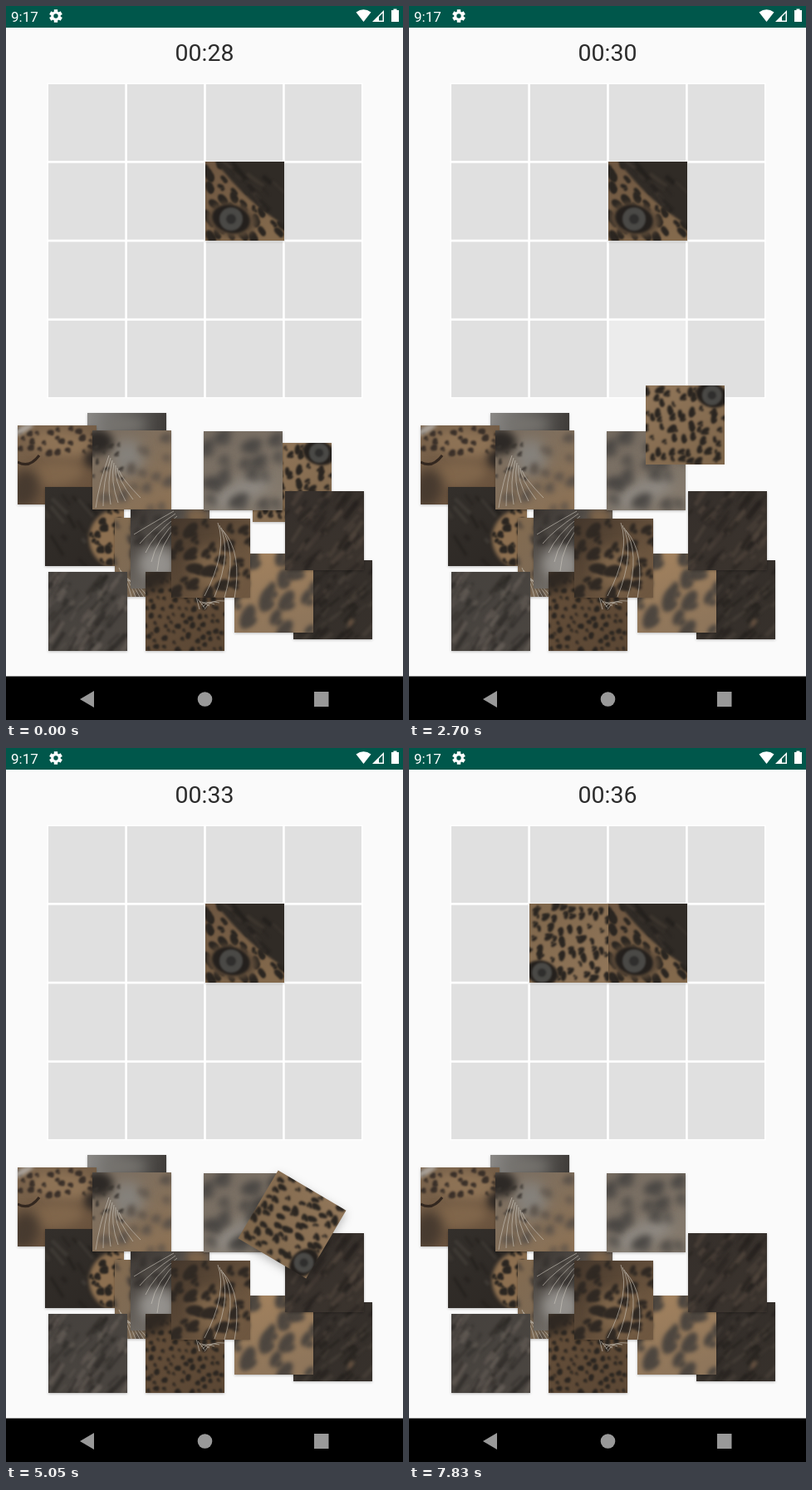
These frames come from a looping animation (478 by 858 pixels, 8.29 s). An HTML page with a canvas:

```html
<!DOCTYPE html>
<html lang="en">
<head>
<meta charset="utf-8">
<title>Picture puzzle</title>
<style>
html, body { margin: 0; width: 100%; height: 100%; overflow: hidden; background: #fafafa; }
canvas { display: block; width: 478px; height: 858px; }
</style>
</head>
<body>
<canvas id="stage" width="478" height="858"></canvas>
<script>
const ctx = document.getElementById('stage').getContext('2d');
const LOOP = 8290, SIZE = 95, DARK = '#2b2621';

function seeded(seed) {
  return () => {
    seed = (seed * 1664525 + 1013904223) % 4294967296;
    return seed / 4294967296;
  };
}

// A tile is a soft gradient decorated by a paint callback.
function tile(seed, from, to, dx, dy, paint) {
  const c = document.createElement('canvas');
  c.width = c.height = SIZE;
  const g = c.getContext('2d'), rnd = seeded(seed);
  const fill = g.createLinearGradient(0, 0, dx * SIZE, dy * SIZE);
  fill.addColorStop(0, from);
  fill.addColorStop(1, to);
  g.fillStyle = fill;
  g.fillRect(0, 0, SIZE, SIZE);
  paint(g, rnd);
  return c;
}

function ellipse(g, x, y, rx, ry, angle, color, blur = 0) {
  g.filter = blur ? `blur(${blur}px)` : 'none';
  g.fillStyle = color;
  g.beginPath();
  g.ellipse(x, y, rx, ry, angle, 0, 7);
  g.fill();
  g.filter = 'none';
}

function spots(g, rnd, n, rx, ry, angle, color, blur, inside = () => true) {
  const step = SIZE / n;
  for (let i = 0; i < n * n; i++) {
    const col = i % n, row = Math.floor(i / n);
    const x = (col + rnd() * 0.8 + (row % 2) * 0.4 - 0.1) * step;
    const y = (row + 0.1 + rnd() * 0.8) * step;
    const k = 0.5 + rnd() * 0.8, a = angle + (rnd() - 0.5) * 1.3;
    if (!inside(x, y)) continue;
    ellipse(g, x, y, rx * k, ry * k, a, color, blur);
    ellipse(g, x + rx * 0.6, y + ry * 0.5, rx * 0.6, ry * 0.5 * k, a + 0.6, color, blur);
  }
}

function bark(g, rnd, angle, light, dark, n = 42) {
  g.save();
  g.filter = 'blur(1.8px)';
  for (let i = 0; i < n; i++) {
    const x = rnd() * SIZE, y = rnd() * SIZE, len = 3 + rnd() * 12;
    const a = angle + (rnd() - 0.5) * 0.4;
    g.strokeStyle = i % 2 ? light : dark;
    g.globalAlpha = 0.3 + rnd() * 0.4;
    g.lineWidth = 2 + rnd() * 4;
    g.beginPath();
    g.moveTo(x - Math.cos(a) * len, y - Math.sin(a) * len);
    g.lineTo(x + Math.cos(a) * len, y + Math.sin(a) * len);
    g.stroke();
  }
  g.restore();
}

function whiskers(g, n, x, y, tx, ty, spreadX, spreadY, bend) {
  g.strokeStyle = 'rgba(205,200,190,.6)';
  g.lineWidth = 1;
  for (let i = 0; i < n; i++) {
    const ex = tx + spreadX * i, ey = ty + spreadY * i;
    g.beginPath();
    g.moveTo(x + i * 2, y + i * 3);
    g.quadraticCurveTo((x + ex) / 2 + bend, (y + ey) / 2 - bend / 2, ex, ey);
    g.stroke();
  }
}

function eye(g, x, y, r, angle) {
  ellipse(g, x, y, r * 1.65, r * 1.2, angle, '#24201d', 1.5);
  ellipse(g, x, y, r, r, 0, '#4a4946', 0.8);
  ellipse(g, x, y, r * 0.42, r * 0.42, 0, '#2f2e2d', 0.8);
}

const muzzle = tile(3, '#7d664e', '#69523d', 0.5, 1, (g, r) => {
  ellipse(g, 55, 22, 40, 16, 0.1, '#8d7255', 6);
  spots(g, r, 8, 2.8, 4, 0.9, '#3a3029', 0.9, (x, y) => y < 42 - x * 0.12);
  ellipse(g, 45, 58, 34, 14, -0.1, '#80664b', 6);
  ellipse(g, 8, 76, 18, 24, 0.3, '#473a2f', 7);
  ellipse(g, 94, 40, 14, 12, 0, '#332c27', 4);
  g.strokeStyle = '#33271f';
  g.lineWidth = 3;
  g.beginPath();
  g.moveTo(0, 44);
  g.quadraticCurveTo(14, 52, 26, 36);
  g.stroke();
  ellipse(g, 6, 5, 15, 4, -0.5, '#aaa299', 2);
});

const cheek = tile(8, '#776d62', '#8c7256', 0.8, 1, (g, r) => {
  ellipse(g, 42, 32, 20, 22, 0, '#85817b', 8);
  ellipse(g, 6, 14, 19, 15, 0, '#2d2926', 5);
  spots(g, r, 5, 4, 7, 0.9, '#5a5149', 3, (x, y) => x + y > 75);
  spots(g, r, 8, 1.5, 4, 0.7, '#3b3631', 1, (x, y) => x < 42 && y < 62 && y > 14);
  whiskers(g, 7, 20, 30, 4, 93, 9, -2, -4);
});

const edgeFace = tile(15, '#332f2b', '#2c2723', 1, 1, (g, r) => {
  bark(g, r, 0.9, '#45403a', '#1e1b18', 26);
  ellipse(g, 89, 62, 36, 36, 0.3, '#8c6f50', 2);
  spots(g, r, 8, 3.8, 5, 0.5, DARK, 0.8, (x, y) => Math.hypot(x - 89, y - 62) < 36);
});

const greyBark = tile(21, '#45413d', '#4b4641', 1, 1, (g, r) => bark(g, r, -0.9, '#69615a', '#2b2825', 80));
const bark1 = tile(34, '#352f2b', '#3b342e', 1, 1, (g, r) => bark(g, r, -0.85, '#51463d', '#24201d', 70));
const bark2 = tile(55, '#322d29', '#37312c', 1, 1, (g, r) => {
  bark(g, r, -0.8, '#4a423a', '#1f1c19', 64);
  ellipse(g, 69, 75, 2, 5, 0.5, '#735a44', 2);
});

const grey = tile(5, '#8b8986', '#3f3c39', 1, 0.1, g => ellipse(g, 45, 14, 26, 8, 0, '#77746f', 7));

const chin = tile(12, '#836b50', '#786a5a', 1, 1, (g, r) => {
  spots(g, r, 5, 4, 7, 0.3, '#4c443d', 2);
  whiskers(g, 6, 5, 60, 15, 95, 5, 0, 3);
});

const lips = tile(19, '#3a3531', '#716c66', 0.5, 0.8, (g, r) => {
  ellipse(g, 32, 66, 22, 20, 0.2, '#94918d', 7);
  spots(g, r, 6, 3, 8, 0.9, '#35312e', 2.5, (x, y) => y < 48);
  ellipse(g, 80, 8, 14, 9, 0, '#7d644a', 4);
  whiskers(g, 5, 52, 2, 4, 30, 7, 11, -8);
});

const neck = tile(27, '#43362b', '#6e5740', 0.8, 0.7, (g, r) => {
  ellipse(g, 52, 62, 28, 26, 0.4, '#7e654a', 8);
  spots(g, r, 5, 5, 9, 0.9, '#302923', 1.8);
  whiskers(g, 4, 56, 5, 40, 93, 12, 1, 20);
});

const brow = tile(41, '#644e39', '#5c4835', 0.8, 1, (g, r) => {
  spots(g, r, 10, 2.3, 3.2, 0.8, DARK, 0.9);
  ellipse(g, 8, 8, 28, 14, -0.4, '#2f2822', 6);
  whiskers(g, 6, 61, 30, 65, 45, 6, -2, 0);
});

const flank = tile(61, '#a3825e', '#8f765b', 0.3, 1, (g, r) => {
  spots(g, r, 4, 7, 13, 0.25, '#4d463f', 2.4);
});

const softFur = tile(73, '#756b60', '#857a6d', 0.8, 1, (g, r) => {
  ellipse(g, 43, 74, 40, 14, -0.4, '#8f8a83', 8);
  spots(g, r, 4, 6, 11, 0.9, '#4a4744', 4);
});

const rightEye = tile(81, '#6c5540', '#83694c', 0.7, 1, (g, r) => {
  spots(g, r, 7, 4.2, 7, -0.6, DARK, 0.9);
  ellipse(g, 32, 70, 30, 20, 0.2, '#5d4b39', 3);
  g.filter = 'blur(1.5px)';
  g.fillStyle = '#302b26';
  g.beginPath();
  g.moveTo(10, -3);
  g.lineTo(98, -3);
  g.lineTo(98, 78);
  g.quadraticCurveTo(52, 52, 10, -3);
  g.fill();
  g.filter = 'none';
  g.save();
  g.clip();
  bark(g, r, 0.75, '#443c34', '#1f1c19', 34);
  g.restore();
  eye(g, 31, 69, 14, 0.25);
});

const leftEye = tile(92, '#92775a', '#7f674c', 0.8, 1, (g, r) => {
  spots(g, r, 8, 2.8, 5.2, 0.5, DARK, 0.9, (x, y) => Math.hypot(x - 80, y - 12) > 17);
  eye(g, 80, 12, 12, 0.3);
});

// Loose pieces from back to front; the moving one starts beneath the last two.
const behind = [
  [grey, 98, 489], [muzzle, 14, 504], [edgeFace, 47, 578], [cheek, 104, 510],
  [chin, 131, 615], [lips, 150, 605], [brow, 168, 680], [bark2, 346, 666],
  [flank, 275, 658], [neck, 199, 616], [greyBark, 51, 680]
];
const above = [[softFur, 238, 511], [bark1, 336, 583]];

// time, x, y
const path = [
  [1690, 297, 525], [1740, 284, 539], [1880, 258, 535], [2080, 239, 508], [2300, 268, 482],
  [2490, 288, 474], [2700, 285, 456], [2940, 225, 411], [3140, 225, 411],
  [3330, 140, 292], [3500, 121, 238], [3660, 170, 320], [3950, 295, 521], [3970, 297, 525],
  [5570, 297, 525], [5780, 210, 380], [5990, 102, 250], [6120, 102, 250],
  [6140, 99, 241], [6380, 119, 225]
];

const clamp = v => Math.max(0, Math.min(1, v));
const ease = (t, a, b) => 0.5 - Math.cos(Math.PI * clamp((t - a) / (b - a))) / 2;
const mix = (a, b, k) => a + (b - a) * k;

function position(t) {
  let i = 0;
  while (i < path.length - 2 && t >= path[i + 1][0]) i++;
  const [t0, x0, y0] = path[i], [t1, x1, y1] = path[i + 1];
  const k = clamp((t - t0) / (t1 - t0)), snap = ease(t, 7280, 7500);
  return [mix(mix(x0, x1, k), 145, snap), mix(mix(y0, y1, k), 187, snap)];
}

function piece(img, x, y, angle = 0, lift = 1) {
  ctx.save();
  ctx.shadowColor = `rgba(0,0,0,${lift ? 0.25 : 0})`;
  ctx.shadowBlur = lift > 1 ? 11 : 3;
  ctx.shadowOffsetY = lift > 1 ? 4 : 1;
  ctx.translate(x + SIZE / 2, y + SIZE / 2);
  ctx.rotate(angle);
  ctx.drawImage(img, -SIZE / 2, -SIZE / 2);
  ctx.restore();
}

function poly(color, ...pts) {
  ctx.fillStyle = color;
  ctx.beginPath();
  for (let i = 0; i < pts.length; i += 2) ctx.lineTo(pts[i], pts[i + 1]);
  ctx.closePath();
  ctx.fill();
}

function rect(color, x, y, w, h) {
  ctx.fillStyle = color;
  ctx.fillRect(x, y, w, h);
}

function text(str, x, y, size, color, align) {
  ctx.font = `${size}px Roboto, sans-serif`;
  ctx.fillStyle = color;
  ctx.textAlign = align;
  ctx.fillText(str, x, y);
}

function gear(x, y) {
  ctx.save();
  ctx.translate(x, y);
  for (let i = 0; i < 6; i++) {
    rect('#fff', -2.2, -7.8, 4.4, 5);
    ctx.rotate(Math.PI / 3);
  }
  ctx.restore();
  ellipse(ctx, x, y, 5.8, 5.8, 0, '#fff');
  ellipse(ctx, x, y, 2.7, 2.7, 0, '#00574b');
}

function bars() {
  rect('#00574b', 0, 0, 478, 26);
  text('9:17', 6, 19, 17, '#fff', 'left');
  gear(60, 12);
  ctx.fillStyle = '#fff';
  ctx.beginPath();
  ctx.moveTo(430.5, 19);
  ctx.lineTo(421.5, 7.5);
  ctx.quadraticCurveTo(430.5, 1, 439.5, 7.5);
  ctx.fill();
  poly('#fff', 441, 19, 455, 19, 455, 5);
  poly('#00574b', 449, 17.5, 453.5, 17.5, 453.5, 8.6, 449, 13.1);
  rect('#fff', 464, 5, 9, 14);
  rect('#fff', 466.5, 3.5, 4, 2);

  rect('#000', 0, 805.5, 478, 53);
  poly('#999', 89, 833, 106, 823, 106, 843);
  ellipse(ctx, 239.5, 833, 8.8, 8.8, 0, '#999');
  rect('#999', 371, 824, 17.5, 18);
}

function activeCell(t, x, y) {
  if (t < 1690 || (t > 3140 && t < 5570) || t > 7300) return -1;
  const col = Math.floor((x + SIZE / 2 - 49.5) / 94.9);
  const row = (y + SIZE / 2 - 92) / 94.9;
  return row < 4.4 ? Math.min(3, Math.floor(row)) * 4 + col : -1;
}

function board(active) {
  rect('#fff', 49.5, 92.5, 380, 379);
  for (let i = 0; i < 16; i++) {
    const x = 51 + (i % 4) * 94.9, y = 94 + Math.floor(i / 4) * 94.7;
    rect(i === active ? '#ececec' : '#e0e0e0', x, y, 92.3, 92);
  }
}

function draw(t) {
  const [x, y] = position(t);
  const angle = Math.PI / 2 * (ease(t, 4440, 4640) + ease(t, 4960, 5190));
  const lift = t < 1690 || t >= 7500 ? 1 : t < 3970 ? 0 : t < 4440 ? 1 : 2;
  const moving = () => piece(leftEye, x, y, angle, lift);
  const ticks = [930, 1930, 2930, 3930, 4870, 5880, 6840, 7830];
  const seconds = 28 + ticks.filter(s => t >= s).length;

  rect('#fafafa', 0, 0, 478, 858);
  bars();
  text('00:' + seconds, 239, 66, 28.5, '#2c2c2c', 'center');
  board(activeCell(t, x, y));
  piece(rightEye, 240, 187);
  behind.forEach(p => piece(...p));
  if (t < 1490) moving();
  above.forEach(p => piece(...p));
  if (t >= 1490) moving();
}

const start = performance.now();
function frame() {
  draw((performance.now() - start) % LOOP);
  requestAnimationFrame(frame);
}
frame();
</script>
</body>
</html>
```
